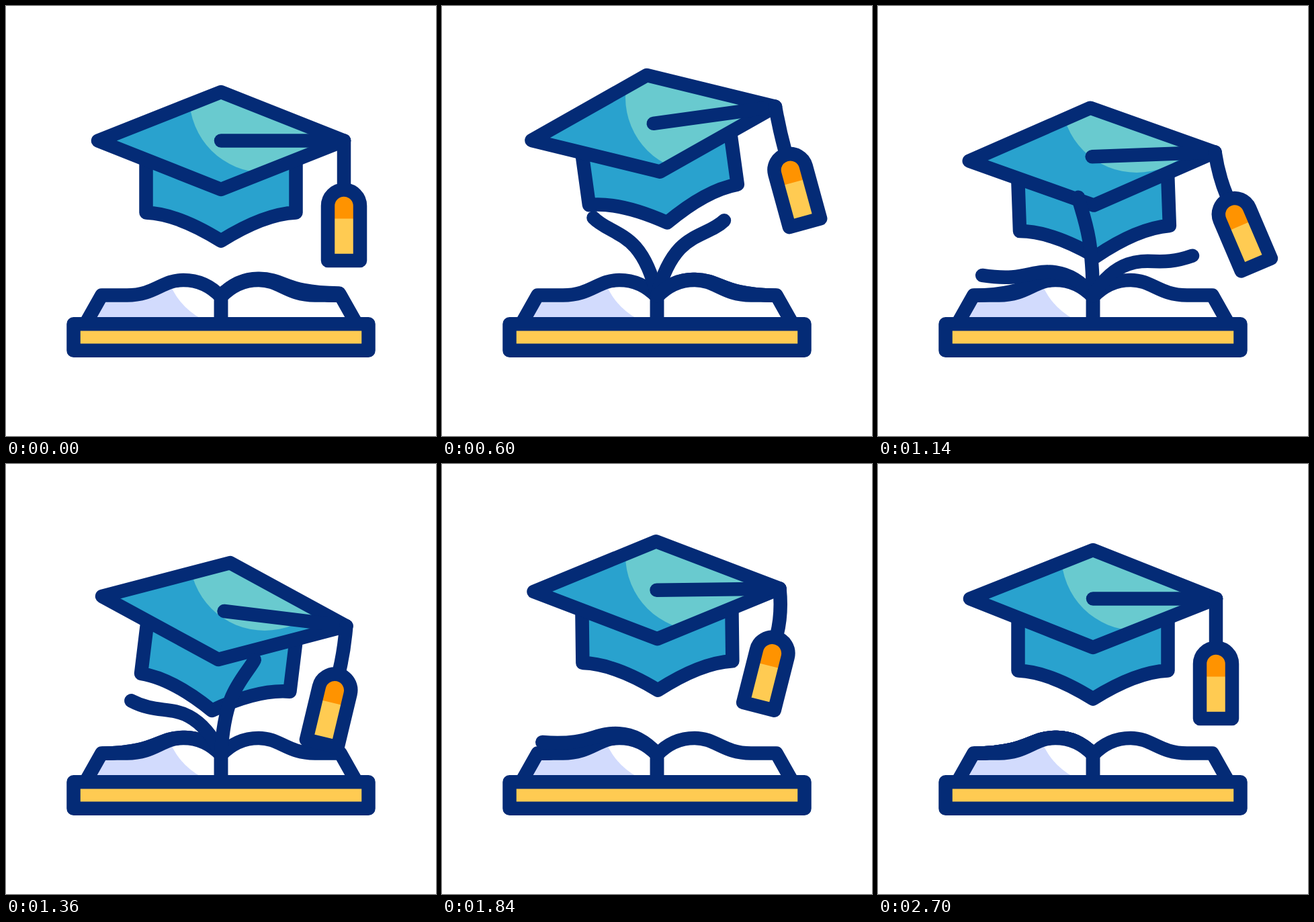
Animation, 640 px wide and 640 px high, one loop 3020 ms. Source, as an HTML page:

```html
<!DOCTYPE html>
<html lang="en">
<head>
<meta charset="utf-8">
<title>Graduation</title>
<style>
  html, body { margin: 0; height: 100%; overflow: hidden; background: #fff; }
  svg { display: block; width: 100vw; height: 100vh; }
  .line { fill: none; stroke: #042b76; stroke-width: 20.5; stroke-linecap: round; stroke-linejoin: round; }
  .blue { fill: #29a2ce; }
  .mint { fill: #69cacf; }
  .gold { fill: #ffcb52; }
  .orange { fill: #ff9300; }
  .lilac { fill: #d2dbfd; }
</style>
</head>
<body>
<svg viewBox="0 0 640 640">
  <defs>
    <path id="leaf" d="M120 470L142.3 430.5H180C222 430.5 232 408 264 408C287 408 306 418 320 433V470"/>
    <path id="board" d="M137 200.5L320 128L503 200.5L320 273Z"/>
    <path id="band" d="M208.5 220V307.5C246 309 284 327 320 349.5C356 327 394 309 431.5 307.5V220"/>
    <path id="tag" d="M-24 81.5V0A24 24 0 0 1 24 0V81.5Z"/>
    <path id="cover" d="M100.5 473.3H539.5V512.7H100.5Z"/>
    <clipPath id="shine"><circle cx="385" cy="136" r="112"/></clipPath>
    <clipPath id="leafClip"><use href="#leaf"/></clipPath>
  </defs>

  <use href="#leaf" class="lilac"/>
  <circle cx="340" cy="374" r="104" fill="#fff" clip-path="url(#leafClip)"/>
  <use href="#leaf" class="line"/>
  <use href="#leaf" class="line" transform="matrix(-1 0 0 1 640 0)"/>
  <use href="#cover" class="gold"/>
  <use href="#cover" class="line"/>

  <g class="cap">
    <use href="#band" class="blue"/>
    <use href="#band" class="line"/>
    <use href="#board" class="blue"/>
  </g>
  <g clip-path="url(#shine)"><g class="cap"><use href="#board" class="mint"/></g></g>
  <g class="cap">
    <use href="#board" class="line"/>
    <path class="line" d="M320 200.5H503"/>
    <path class="line" id="string"/>
    <g id="tassel">
      <use href="#tag" class="gold"/>
      <path class="orange" d="M-24 19V0A24 24 0 0 1 24 0V19Z"/>
      <use href="#tag" class="line"/>
    </g>
  </g>
  <g id="pages"></g>
</svg>
<script>
const LOOP = 3020, MOVING = 2700, SWING = 600;
const PAGES = 4, FLIP = 900, STAGGER = 1000 / 3, LEAD = 10;
const $ = id => document.getElementById(id);
const caps = document.querySelectorAll('.cap');
const mix = (a, b, k) => a + (b - a) * k;
const smooth = k => k * k * (3 - 2 * k);
const clamp = k => Math.min(1, Math.max(0, k));

// Eases from 0 through each peak and back to 0, one swing per peak.
function swing(t, delay, ...peaks) {
  let value = 0;
  [...peaks, 0].forEach((peak, i) => {
    const from = delay + i * SWING, to = Math.min(from + SWING, MOVING);
    value = mix(value, peak, smooth(clamp((t - from) / (to - from))));
  });
  return value;
}

// Five curve points of a page: share of its length when flat, and height above the chord.
const FLAT = [0.08, 0.19, 0.32, 0.55, 0.53];
const BULGE = [14, 25, 24, 22.5, 2];

function pagePath(progress) {
  const angle = Math.PI * mix(progress, smooth(progress), 0.5);
  const cos = Math.cos(angle), sin = Math.sin(angle);
  const length = 148 + 29 * (1 - sin) ** 2;
  const bend = cos * (2 - Math.abs(cos));
  const point = (along, up) => `${320 + along * cos - up * sin} ${431 - along * sin - up * cos}`;
  const curve = FLAT.map((share, i) =>
    point(length * mix(share, (i + 1) / 5.3, sin), BULGE[i] * bend));
  return `M320 431C${curve.join(' ')} ${point(length, 0)}`;
}

const pages = Array.from({ length: PAGES }, () => {
  const page = document.createElementNS('http://www.w3.org/2000/svg', 'path');
  page.setAttribute('class', 'line');
  return $('pages').appendChild(page);
});

function drawTassel(t) {
  const turn = swing(t, 400, -28.6, 25.4, -4.2), rad = turn * Math.PI / 180;
  const chord = rad * (turn < 0 ? 0.74 : 0.49);
  const x = 503 - 97 * Math.sin(chord), y = 200.5 + 97 * Math.cos(chord);
  const above = d => `${x + d * Math.sin(rad)} ${y - d * Math.cos(rad)}`;
  $('string').setAttribute('d', `M503 200.5Q${above(61)} ${above(28)}`);
  $('tassel').setAttribute('transform', `translate(${x} ${y}) rotate(${turn})`);
}

function draw(t) {
  const lift = swing(t, 0, -26, 25, -13, 4), tilt = swing(t, 240, -12.1, 7.9, -3.7);
  caps.forEach(cap =>
    cap.setAttribute('transform', `translate(0 ${lift}) rotate(${tilt} 320 239)`));
  drawTassel(t);
  pages.forEach((page, i) =>
    page.setAttribute('d', pagePath(clamp((t + LEAD - i * STAGGER) / FLIP))));
}

const start = performance.now();
function tick() {
  draw(Math.min((performance.now() - start) % LOOP, MOVING));
  requestAnimationFrame(tick);
}
tick();
</script>
</body>
</html>
```
